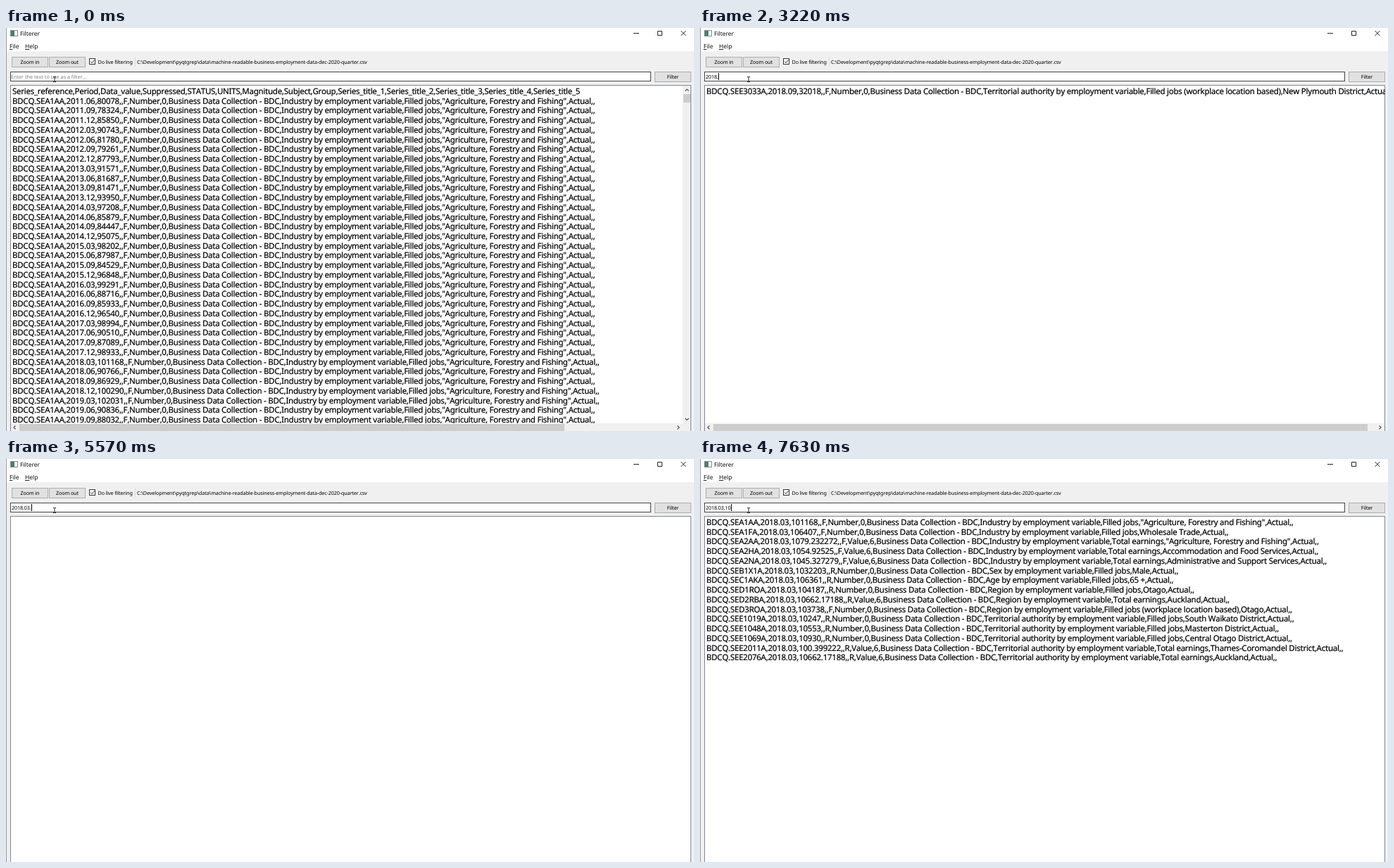
Animation of 977 by 573 pixels, one loop 8 s. Source, as an HTML page:

```html
<!DOCTYPE html>
<html lang="en">
<head>
<meta charset="utf-8">
<title>Filterer</title>
<style>
  html, body { margin: 0; width: 100%; height: 100%; overflow: hidden; background: #f0f0f0; text-rendering: geometricPrecision; }
  svg { position: absolute; left: 0; top: 0; font: 7.2px "Noto Sans", sans-serif; font-kerning: none; letter-spacing: -.12px; }
  rect { shape-rendering: crispEdges; }
  .shell { font: 8.5px "Open Sans", sans-serif; letter-spacing: 0; }
  .key { text-decoration: underline; }
  .button rect { fill: #e1e1e1; stroke: #adadad; }
  .button text { text-anchor: middle; }
  .line { fill: none; stroke: #222; }
  .arrow { fill: none; stroke: #555; stroke-width: 1.2; }
  .thumb { fill: #cdcdcd; }
  .track { fill: #f0f0f0; }
  #list {
    position: absolute; left: 9px; top: 84px; width: 964px; height: 489px; margin: 0; overflow: hidden;
    font: 11.5px/13.73px "Noto Sans", sans-serif; font-kerning: none; letter-spacing: -.25px;
    color: #000; -webkit-text-stroke: .2px #000;
  }
</style>
</head>
<body>
<svg width="977" height="573">
  <rect width="977" height="33" fill="#fff"/>
  <rect width="1" height="573" fill="#999"/>
  <rect x="6.5" y="3.5" width="10" height="8" fill="#fff" stroke="#888"/>
  <rect x="7" y="4" width="5" height="7" fill="#3f8374"/>
  <g class="shell">
    <text x="20" y="11">Filterer</text>
    <text x="5" y="29"><tspan class="key">F</tspan>ile</text>
    <text x="27" y="29"><tspan class="key">H</tspan>elp</text>
  </g>
  <path class="line" d="M891 7.5h8M925.5 4.5h6v6h-6zM958.5 4l7 7m0-7l-7 7"/>
  <g class="button">
    <rect x="8.5" y="41.5" width="51" height="14"/><text x="34" y="51">Zoom in</text>
    <rect x="61.5" y="41.5" width="51" height="14"/><text x="87" y="51">Zoom out</text>
    <rect x="921.5" y="62.5" width="51" height="14"/><text x="947" y="72">Filter</text>
  </g>
  <rect x="118.5" y="43.5" width="8" height="8" fill="#fff" stroke="#333"/>
  <path class="line" d="M120 47.5l2 2 3.5-4"/>
  <text x="130.5" y="51">Do live filtering</text>
  <rect x="183" y="41" width="1" height="14" fill="#dadada"/>
  <text x="186" y="51">C:\Development\pyqtgrep\data\machine-readable-business-employment-data-dec-2020-quarter.csv</text>
  <rect x="6.5" y="62.5" width="909" height="13" fill="#fff" stroke="#444"/>
  <text id="hint" x="7" y="72" fill="#808080" letter-spacing="0">Enter the text to use as a filter...</text>
  <text id="query" x="8" y="72"></text>
  <rect id="caret" y="64" width="1" height="10"/>
  <path class="line" d="M67 69.5h1.5l.5.5.5-.5h1.5M69 70v6M67 76.5h1.5l.5-.5.5.5h1.5"/>
  <rect x="6.5" y="81.5" width="966" height="500" fill="#fff" stroke="#828790"/>
</svg>
<pre id="list"></pre>
<svg width="977" height="573">
  <g id="hbar">
    <rect class="track" x="7" y="562" width="965" height="11"/>
    <rect class="thumb" id="hthumb" x="19" y="563" height="10"/>
    <path class="arrow" d="M13.5 565.5l-2.5 2.5 2.5 2.5"/>
    <path class="arrow" id="right" d="M-1.5 565.5l2.5 2.5-2.5 2.5"/>
  </g>
  <g id="vbar">
    <rect class="track" x="961" y="82" width="11" height="480"/>
    <rect class="thumb" id="vthumb" x="962" y="94" width="10"/>
    <path class="arrow" d="M964.5 89.5l2.5-2.5 2.5 2.5M964.5 555l2.5 2.5 2.5-2.5"/>
  </g>
</svg>
<script>
const $ = id => document.getElementById(id);
const LOOP = 8000, VISIBLE = 35;
const JOBS = 'Filled jobs', PAY = 'Total earnings', LOCAL = JOBS + ' (workplace location based)';
const AREA = 'Territorial authority';

const rows = ['Series_reference,Period,Data_value,Suppressed,STATUS,UNITS,Magnitude,Subject,Group,' +
  [1, 2, 3, 4, 5].map(n => 'Series_title_' + n)];

function add(code, period, value, group, measure, title, flag = 'F') {
  const units = measure === PAY ? 'Value,6' : 'Number,0';
  rows.push(`BDCQ.${code},${period},${value},,${flag},${units},Business Data Collection - BDC,` +
    `${group} by employment variable,${measure},${title},Actual,,`);
}

// Quarterly values; "first" counts quarters from March 2011.
function addQuarters(code, first, values, title, flag) {
  values.split(' ').forEach((value, i) => {
    const q = first + i;
    const month = String(q % 4 * 3 + 3).padStart(2, '0');
    add(code, `${2011 + (q >> 2)}.${month}`, value, 'Industry', JOBS, title, flag);
  });
}

// Letter, title, filled jobs from March 2018, total earnings in March 2018.
const industries = [
  ['A', '"Agriculture, Forestry and Fishing"', '80078 78324 85850 90743 81780 79261 87793 91571 81687 81471 93950 ' +
    '97208 85879 84447 95075 98202 87987 84529 96848 99291 88716 85933 96540 98994 90510 87089 98933 ' +
    '101168 90766 86929 100290 102031 90836 88032 99214', '1079.232272'],
  ['B', 'Mining', '5370 5385 5461 5434', '157.710599'],
  ['C', 'Manufacturing', '225445 224308 218059 223667', '3588.958115'],
  ['D', '"Electricity, Gas, Water and Waste Services"', '18505 18511 18512 18812', '374.312012'],
  ['E', 'Construction', '150345 151978 150157 155400', '2280.693961'],
  ['F', 'Wholesale Trade', '106407 105577 105618 107718', '1728.143292'],
  ['G', 'Retail Trade', '198648 196372 194468 202633', '1924.904167'],
  ['H', 'Accommodation and Food Services', '140352 139249 135443 142465', '1054.92525'],
  ['I', '"Transport, Postal and Warehousing"', '87091 86960 86621', '1428.083553'],
  ['J', 'Information Media and Telecommunications', '34942 34641 34597', '597.233451'],
  ['K', 'Financial and Insurance Services', '60262 60530 59986', '1359.382143'],
  ['L', '"Rental, Hiring and Real Estate Services"', '32046 32094', '454.364381'],
  ['M', '"Professional, Scientific and Technical Services"', '148620', '2805.364418'],
  ['N', 'Administrative and Support Services', '99838', '1045.327279'],
  ['O', 'Public Administration and Safety', '120488', '2154.288357'],
  ['P', 'Education and Training', '172765'],
  ['Q', 'Health Care and Social Assistance', '222710'],
  ['R', 'Arts and Recreation Services', '39038'],
  ['S', 'Other Services', '63297'],
  ['Z', 'Total Industry', '2027337']
];
for (const [id, title, jobs] of industries)
  addQuarters(`SEA1${id}A`, id === 'A' ? 1 : 28, jobs, title, 'PZ'.includes(id) ? 'R' : 'F');
for (const [id, title, , pay] of industries)
  if (pay) add(`SEA2${id}A`, '2018.03', pay, 'Industry', PAY, title);

for (const [code, value, group, measure, title, flag = 'R'] of [
  ['B1X1A', '1032203', 'Sex', JOBS, 'Male'],
  ['C1ABA', '119846', 'Age', JOBS, '15-19'],
  ['C1ADA', '187214', 'Age', JOBS, '25-29'],
  ['C1AKA', '106361', 'Age', JOBS, '65 +'],
  ['D1RCA', '186512', 'Region', JOBS, 'Waikato'],
  ['D1ROA', '104187', 'Region', JOBS, 'Otago'],
  ['D2RBA', '10662.17188', 'Region', PAY, 'Auckland'],
  ['D3RCA', '183655', 'Region', LOCAL, 'Waikato', 'F'],
  ['D3ROA', '103738', 'Region', LOCAL, 'Otago', 'F'],
  ['E1012A', '14872', AREA, JOBS, 'Matamata-Piako District'],
  ['E1013A', '19843', AREA, JOBS, 'Waipa District'],
  ['E1019A', '10247', AREA, JOBS, 'South Waikato District'],
  ['E1022A', '13915', AREA, JOBS, 'Whakatane District'],
  ['E1031A', '19962', AREA, JOBS, 'Gisborne District'],
  ['E1042A', '11328', AREA, JOBS, 'Horowhenua District'],
  ['E1048A', '10553', AREA, JOBS, 'Masterton District'],
  ['E1063A', '15834', AREA, JOBS, 'Ashburton District'],
  ['E1069A', '10930', AREA, JOBS, 'Central Otago District'],
  ['E2011A', '100.399222', AREA, PAY, 'Thames-Coromandel District'],
  ['E2076A', '10662.17188', AREA, PAY, 'Auckland']
]) add('SE' + code, '2018.03', value, group, measure, title, flag);
add('SEE3033A', '2018.09', '32018', AREA, LOCAL, 'New Plymouth District');

// Start time, typed text, caret shown.
const steps = [
  [0, '', 0], [140, '', 1], [680, '', 0], [1050, '2', 1], [1170, '20', 1], [1640, '20', 0],
  [1770, '201', 1], [1910, '2018', 1], [2160, '2018,', 1], [2690, '2018,', 0], [3220, '2018,', 1],
  [3780, '2018,', 0], [3900, '2018', 1], [4270, '2018.', 1], [4770, '2018.', 0], [4890, '2018.0', 1],
  [5010, '2018.03', 1], [5570, '2018.03.', 1], [6130, '2018.03.', 0], [6310, '2018.03', 1],
  [6810, '2018.03', 0], [6950, '2018.03,', 1], [7230, '2018.03,1', 1], [7630, '2018.03,10', 1]
];
const thumbHeights = { '2018.0': 16, '2018.03': 48, '2018.03,': 48, '2018.03,1': 150 };
const thumbEnds = { '': 793, '2': 793, '2018,': 948, '2018.03,1': 902 };

const show = (id, on) => $(id).setAttribute('visibility', on ? 'visible' : 'hidden');
const set = (id, name, value) => $(id).setAttribute(name, value);

function render([, text, caret]) {
  const found = rows.filter(row => row.includes(text)).slice(0, VISIBLE);
  const tall = found.length === VISIBLE, wide = tall || text === '2018,';
  $('list').textContent = found.join('\n');
  $('query').textContent = text;
  show('hint', !text);
  show('caret', caret);
  set('caret', 'x', Math.floor(8.5 + (text ? $('query').getComputedTextLength() : 0)));
  show('vbar', tall);
  show('hbar', wide);
  set('vthumb', 'height', thumbHeights[text] || 12);
  set('hthumb', 'width', (thumbEnds[text] || 895) - 19);
  set('right', 'transform', `translate(${tall ? 955 : 966})`);
}

let current;
function tick() {
  const time = performance.now() % LOOP;
  const step = steps.findLast(([start]) => start <= time);
  if (step !== current) render(current = step);
  requestAnimationFrame(tick);
}
tick();
</script>
</body>
</html>
```
